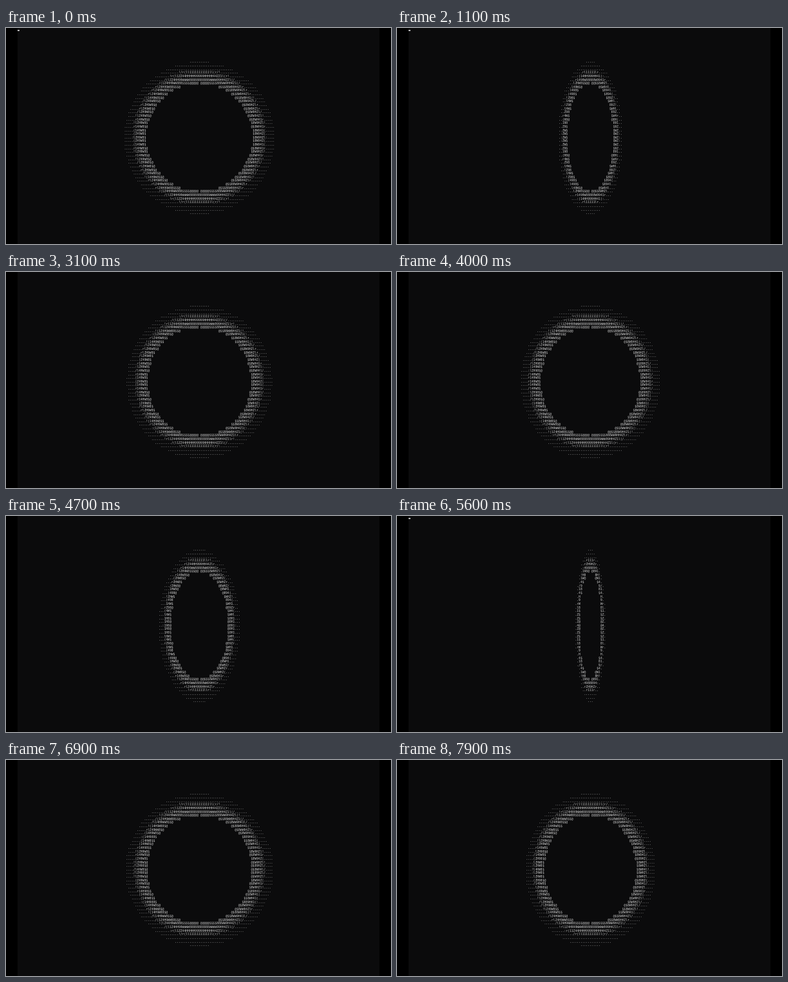
An HTML page with a canvas that plays this animation: 600x338 px, repeating every 8 s.

```html
<!DOCTYPE html>
<html lang="en">
<head>
<meta charset="utf-8">
<title>Spinning ASCII ring</title>
<style>
  html, body { margin: 0; width: 100%; height: 100%; overflow: hidden; background: #000; }
  canvas { display: block; width: 600px; height: 338px; }
</style>
</head>
<body>
<canvas id="stage" width="600" height="338"></canvas>
<script>
  const ctx = document.getElementById('stage').getContext('2d');
  const LOOP = 8000, STEP = 100;
  const COLS = 200, ROWS = 60, CELL_W = 2.82, CELL_H = 5.64;
  const LEFT = 18, BASELINE = 3.6;
  const START_DEG = 12.05, DEG_PER_MS = 0.0481;
  const RAMP = '.:!/r(l1Z4H9W8$@';

  // Ring glyph at a cell; x and y are offsets from the centre in columns and rows.
  function glyph(x, y, squash) {
    const r2 = ((x / squash) ** 2 + (2 * y) ** 2) / 3600;
    if (r2 <= 0.25 || r2 > 0.5) return ' ';
    return RAMP[Math.floor(40 * Math.sqrt(Math.max(0, 0.399 - r2)))];
  }

  function draw(ms) {
    ctx.setTransform(1, 0, 0, 1, 0, 0);
    ctx.fillStyle = '#000';
    ctx.fillRect(0, 0, 600, 338);
    ctx.fillStyle = '#0b0b0c';
    ctx.fillRect(LEFT, 0, COLS * CELL_W, 338);

    if (ms < 2000 || (ms >= 5500 && ms < 6500)) {
      ctx.fillStyle = '#e6e6e6';
      ctx.fillRect(LEFT, 3, 3, 1.6);
    }

    const angle = (START_DEG + DEG_PER_MS * ms) * Math.PI / 180;
    const squash = Math.abs(Math.cos(angle));
    ctx.fillStyle = '#ccc';
    // Large type scaled down keeps fractional glyph positions.
    ctx.setTransform(0.1, 0, 0, 0.1, 0, 0);
    ctx.font = '46.84px "DejaVu Sans Mono", monospace';
    for (let row = 0; row < ROWS; row++) {
      for (let col = 0; col < COLS; col++) {
        const ch = glyph(col - COLS / 2, row - ROWS / 2, squash);
        if (ch !== ' ') {
          ctx.fillText(ch, 10 * (LEFT + col * CELL_W), 10 * (row * CELL_H + BASELINE));
        }
      }
    }
  }

  const start = performance.now();
  let shown = -1;
  function tick() {
    const ms = Math.floor((performance.now() - start) % LOOP / STEP) * STEP;
    if (ms !== shown) draw(shown = ms);
    requestAnimationFrame(tick);
  }
  tick();
</script>
</body>
</html>
```
